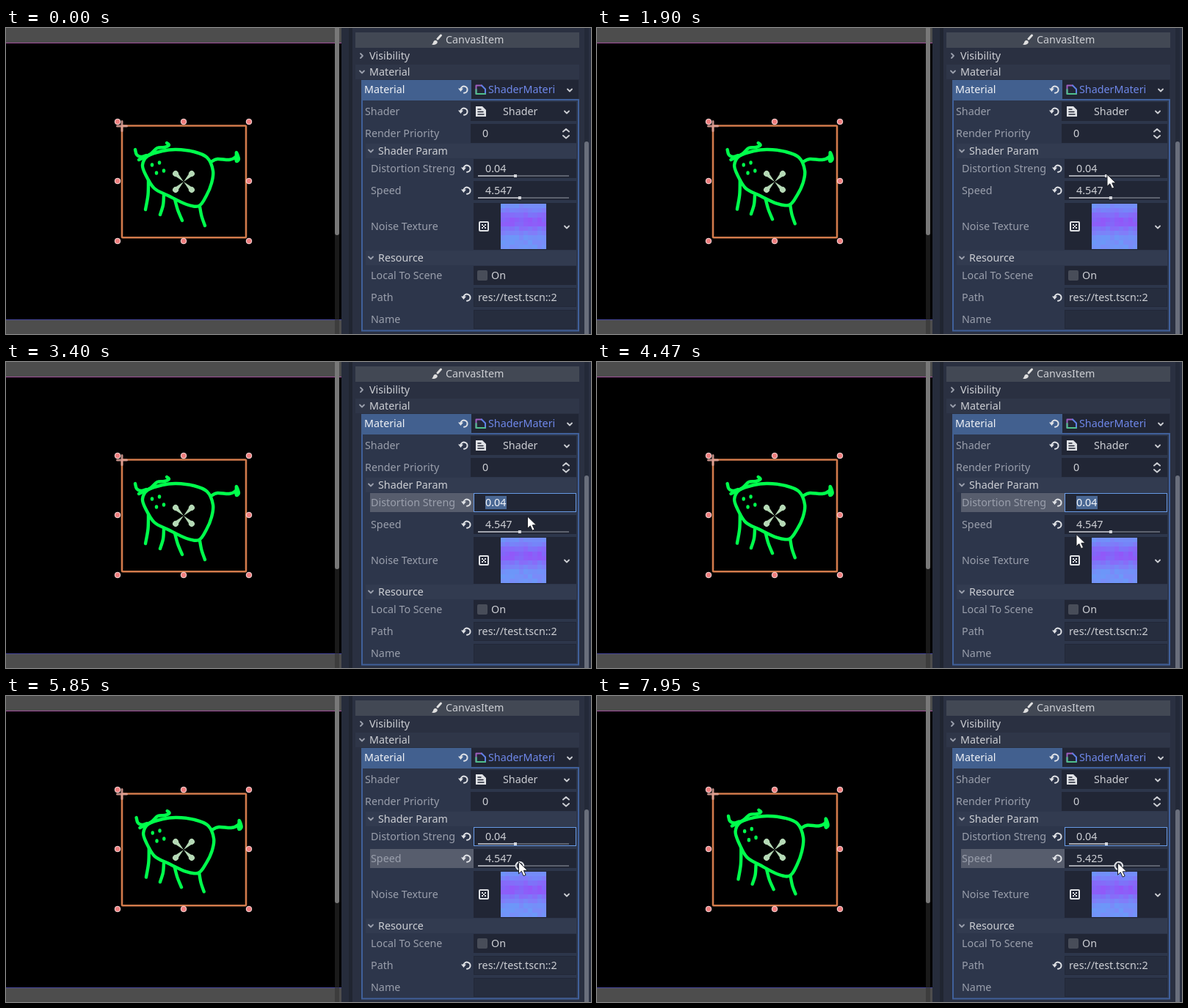
An HTML page for the animation above (8000 ms loop, 797 by 418 pixels).

```html
<!DOCTYPE html>
<html lang="en">
<head>
<meta charset="utf-8">
<title>Shader inspector</title>
<style>
  html, body { margin: 0; width: 100%; height: 100%; overflow: hidden; background: #000; }
  svg { display: block; width: 797px; height: 418px; }
  text { font: 14.3px "Noto Sans", "Open Sans", sans-serif; white-space: pre; }
</style>
</head>
<body>
<svg id="stage" viewBox="0 0 797 418" xmlns="http://www.w3.org/2000/svg"></svg>
<script>
const LOOP = 8000;
const LIGHT = '#cdcfd4', DIM = '#9a9fac', FIELD = '#212635', ICON = '#e0e2e6', GREEN = '#00ff4c';
const stage = document.getElementById('stage');

function add(tag, attrs, parent = stage) {
  const el = document.createElementNS('http://www.w3.org/2000/svg', tag);
  for (const k in attrs) el.setAttribute(k, attrs[k]);
  parent.appendChild(el);
  return el;
}
const rect = (x, y, width, height, fill, more) => add('rect', { x, y, width, height, fill, ...more });
const shape = (d, fill) => add('path', { d, fill });
const line = (d, stroke, width = 2, parent) =>
  add('path', { d, stroke, 'stroke-width': width, fill: 'none', 'stroke-linecap': 'round', 'stroke-linejoin': 'round' }, parent);
const dot = (cx, cy, r, fill, more) => add('circle', { cx, cy, r, fill, ...more });
function label(x, mid, str, fill = LIGHT) {
  const el = add('text', { x, y: mid + 5, fill });
  el.textContent = str;
  return el;
}
const show = (el, on) => el.setAttribute('visibility', on ? 'visible' : 'hidden');

// Viewport
rect(0, 0, 457, 20, '#4d4d4d');
rect(0, 20, 457, 1, '#a0509a');
rect(0, 398, 457, 1, '#46469c');
rect(0, 399, 457, 19, '#4d4d4d');
rect(448, 0, 6, 418, '#303030', { opacity: .55 });
rect(448, -5, 6, 288, '#787878', { rx: 3 });

// Creature
const body = [[186, 187], [193, 175], [213, 168], [232, 166], [256, 169], [274, 177], [282, 195], [280, 212],
              [273, 229], [263, 243], [246, 241], [221, 229], [202, 219], [190, 200]];
const horns = [[[176, 166], [178, 173], [184, 176], [191, 174]],
               [[181, 180], [197, 172], [206, 164], [216, 163], [222, 160], [219, 157]]];
const tail = [[279, 183], [288, 179], [304, 180], [313, 176], [314, 170], [317, 179], [314, 182], [313, 176]];
const legs = [[194, 208, 190, 248], [215, 229, 210, 255], [230, 234, 240, 263], [264, 244, 271, 270]]
  .map(([x, y, u, v]) => [[x, y], [(x + u) / 2 + (u < x ? 1.5 : -1), (y + v) / 2], [u, v]]);
const spots = [[199, 187], [209, 184], [205, 198], [215, 195]].map(([x, y]) => [[x, y - .6], [x, y + .6]]);
const strokes = [[...body, body[0]], ...horns, tail, ...legs, ...spots];

// The distortion shader: a smooth offset field for each pose
const fields = [
  () => [0, 0],
  (u, v) => [.6 - 3 * u, 2.5 * Math.sin(2.5 * v)],
  (u, v) => [2.8 * u * u - .1 - 1.2 * v * (u + .7), -1.6 * Math.max(0, v) * (u + 1)]
];
function warp([x, y], field) {
  const [dx, dy] = field((x - 240) / 80, (y - 210) / 50);
  return [x + dx, y + dy];
}
function smooth(p) {
  const n = p.length - 1, closed = n > 9;
  const at = i => p[closed ? (i + n) % n : Math.min(Math.max(i, 0), n)];
  let d = 'M' + p[0];
  for (let i = 0; i < n; i++) {
    const [a, b, c, e] = [at(i - 1), at(i), at(i + 1), at(i + 2)];
    const ctrl = (q, from, to, s) => [q[0] + s * (to[0] - from[0]) / 6, q[1] + s * (to[1] - from[1]) / 6];
    d += `C${ctrl(b, a, c, 1)} ${ctrl(c, b, e, -1)} ${c}`;
  }
  return d;
}
const poses = fields.map(field => {
  const g = add('g', {});
  strokes.forEach(s => line(smooth(s.map(p => warp(p, field))), GREEN, 4.4, g));
  return g;
});

// Selection gizmos
rect(158, 133.5, 169, 152.7, 'none', { stroke: '#d27b4c', 'stroke-width': 2.6, rx: 1 });
line('M151.5 134H164.5M158 127.5V140.5', '#e2a49b', 3).setAttribute('opacity', .85);
for (const x of [152, 242, 331]) for (const y of [128, 209, 291])
  if (x !== 242 || y !== 209) dot(x, y, 3.8, '#ef7f7f', { stroke: '#fbdcdc', 'stroke-width': 1 });
for (let turn = 45; turn < 360; turn += 90) {
  const g = add('g', { transform: `translate(242 210) rotate(${turn})`, fill: '#b5d9b6' });
  add('circle', { cx: 15.5, r: 4 }, g);
  add('path', { d: 'M0 0L15 -3V3Z' }, g);
}

// Inspector frame
rect(457, 0, 340, 418, '#202531');
rect(457, 0, 10, 418, '#262c3b');
rect(472, 0, 325, 418, '#2a3041');
rect(476, 6, 305, 21, '#424854');
rect(476, 50, 305, 20, '#2f3648');
rect(788, 0, 6, 418, '#232938');
rect(788, 155, 6, 270, '#6a6f7c', { rx: 3 });
rect(485, 98, 295, 315.5, '#2d364b', { stroke: '#40609a', 'stroke-width': 2 });
rect(484, 71, 150, 28, '#42608f');
rect(634, 71, 146, 25.5, FIELD);

const chevron = (x, y, color = LIGHT) => line(`M${x - 3} ${y - 1.5}l3 3l3 -3`, color, 1.8);
function reset(x, y) {
  line(`M${x - 3.5} ${y - 1}A4.6 4.6 0 1 1 ${x + 1} ${y + 4.8}`, ICON);
  shape(`M${x - 7} ${y - 1.5}h7l-3.5 4.5Z`, ICON);
}
function section(x, y, name) {
  if (x > 490) rect(490, y - 10, 287, 20, '#323b50');
  chevron(x, y, DIM);
  label(x + 10, y, name);
}

// Section headers
line('M588 15L592.5 10', '#e0e0e0', 3);
shape('M580 22.5Q582 21 582.5 18.5Q584 15.5 587 17.5Q589 20 586 22Q583 23.5 580 22.5Z', '#e0e0e0');
label(599, 16, 'CanvasItem');
line('M483 35l3 3l-3 3', DIM, 1.8);
label(495, 38, 'Visibility');
section(485, 60, 'Material');
section(497, 168, 'Shader Param');
section(497, 314, 'Resource');

// Fields, and row marks shown while a property is focused
for (const y of [101, 131]) rect(633, y, 144, 26, FIELD);
for (const y of [179, 209, 325]) rect(637, y, 140, 26, FIELD);
rect(637, 239, 140, 64, FIELD);
for (const y of [355, 385]) rect(637.5, y + .5, 139, 25, '#262d3e', { stroke: '#222838' });
const marks = [179, 209].map(y => rect(496, y, 141, 26, '#575d6d'));

// Row labels
label(488, 84, 'Material', '#f0f2f6');
['Shader', 'Render Priority'].forEach((s, i) => label(489, 114 + 30 * i, s, DIM));
['Distortion Streng', 'Speed'].forEach((s, i) => label(497, 192 + 30 * i, s, DIM));
label(497, 271, 'Noise Texture', DIM);
['Local To Scene', 'Path', 'Name'].forEach((s, i) => label(497, 338 + 30 * i, s, DIM));
[84, 114].forEach(y => reset(623, y));
[192, 222, 368].forEach(y => reset(627, y));

// Material and shader pickers
line('M640.5 90V78.5H648', '#a05fc0');
line('M648 78.5L653 83.5V90', '#5f82e8');
line('M640.5 84V90H653', '#4fbf8c');
label(657, 84, 'ShaderMateri', '#6f88ea');
chevron(768, 85);
shape('M640 107H649L654 112V121H640Z', ICON);
line('M643 111h4M643 114.5h7M643 118h8', FIELD, 1.4);
label(677, 114, 'Shader');
chevron(764, 115);
label(649, 144, '0');
line('M759 141.5l4 -3.5l4 3.5M759 147l4 3.5l4 -3.5', LIGHT, 1.9);

// Sliders
function slider(y) {
  rect(643, y, 124, 2, '#5c616e');
  const track = stage.lastChild;
  const fill = rect(643, y, 0, 2, '#a3a6af'), knob = rect(0, y - 1, 4, 4, '#d5d7dc');
  return {
    parts: [track, fill, knob], knob,
    set(x) { fill.setAttribute('width', x - 643); knob.setAttribute('x', x - 2); }
  };
}
const distortion = slider(201), speed = slider(231);
distortion.set(694);
const ring = dot(700, 232, 5.2, '#3a4050', { stroke: '#e2e4e8', 'stroke-width': 2 });
const selection = rect(653, 183, 29, 18, '#4a6894');
const distText = label(653, 192, '0.04');
const speedText = label(653, 222, '4.547');
const focusBox = rect(637.5, 179.5, 139, 25, 'none', { stroke: '#699ce8' });
const caret = rect(653, 183, 1, 18, '#e8eaf0');

// Noise preview
rect(645, 265, 12, 12, 'none', { stroke: ICON, 'stroke-width': 2, rx: 1 });
for (const x of [649, 653]) for (const y of [269, 273]) rect(x - 1, y - 1, 2, 2, ICON);
rect(650, 270, 2, 2, ICON);
let seed = 11;
const rnd = () => (seed = (seed * 16807) % 2147483647) / 2147483647;
const CELL = 6.2;
for (let j = 0; j < 10; j++) for (let i = 0; i < 10; i++) {
  const purple = Math.exp(-(((j - 3.3) / 2.4) ** 2)), k = (rnd() - .5) * 16;
  const rgb = [114 + 24 * purple + k, 148 - 54 * purple - k, 249].map(Math.round);
  rect(674 + i * CELL, 240 + j * CELL, CELL, CELL, `rgb(${rgb})`, { 'shape-rendering': 'crispEdges' });
}
chevron(764, 272);

// Resource values
rect(642, 331, 14, 14, '#484d59', { rx: 2 });
label(661, 338, 'On');
label(643, 368, 'res://test.tscn::2');

// Pointers
const beam = line('M694 193h6M697 193v16M694 209h6', '#e6e8ec', 1.3);
const arrow = add('path', {
  d: 'M0 0V16.3L3.8 12.8L6.6 19.2L9.6 17.9L6.8 11.8H12Z',
  fill: '#fff', stroke: '#1b1e26', 'stroke-linejoin': 'round'
});

// Event times, and pointer moves: start, end, x, y
const ENTER = 660, EDIT = 2380, LEAVE = 2850, GRAB = 5660, DRAG = 6000;
const moves = [
  [ENTER, 1140, 758, 328], [1340, 1830, 695, 200], [LEAVE, 3130, 710.5, 211], [4200, 4470, 653, 235.5],
  [4500, 5030, 584, 236], [5160, 5750, 698.5, 226.5], [DRAG, 6950, 709.5, 228]
];
function pointer(t) {
  let x = 775, y = 378;
  for (const [from, to, u, v] of moves) {
    const k = Math.min(Math.max((t - from) / (to - from), 0), 1);
    x += (u - x) * k;
    y += (v - y) * k;
  }
  return [x, y];
}

// Three poses per cycle, quickening slightly towards the end
function poseAt(t) {
  const s = t / 1000;
  return Math.floor(3 * (s / .676 + 1.452e-4 * s ** 4)) % 3;
}

function draw(t) {
  const pose = poseAt(t);
  poses.forEach((g, i) => show(g, i === pose));

  const editing = t >= EDIT && t < GRAB, grabbed = t >= GRAB;
  show(marks[0], editing);
  show(marks[1], grabbed);
  show(selection, editing);
  show(focusBox, t >= EDIT);
  show(caret, editing && Math.floor((t - EDIT) / 500) % 2 === 1);
  distortion.parts.forEach(el => show(el, !editing));
  distText.setAttribute('fill', editing ? '#f2f4f8' : LIGHT);

  const [x, y] = pointer(t);
  const value = 4.547 + (t < DRAG ? 0 : (x - 698.5) / 11 * .878);
  const knob = 643.5 + value * 12.4;
  speedText.textContent = value.toFixed(3);
  speed.set(knob);
  ring.setAttribute('cx', knob);
  show(speed.knob, !grabbed);
  show(ring, grabbed);

  const overText = t >= EDIT && t < LEAVE;
  show(beam, overText);
  show(arrow, t >= ENTER && !overText);
  arrow.setAttribute('transform', `translate(${x} ${y})`);
}

const start = performance.now();
function tick() {
  draw((performance.now() - start) % LOOP);
  requestAnimationFrame(tick);
}
tick();
</script>
</body>
</html>
```
